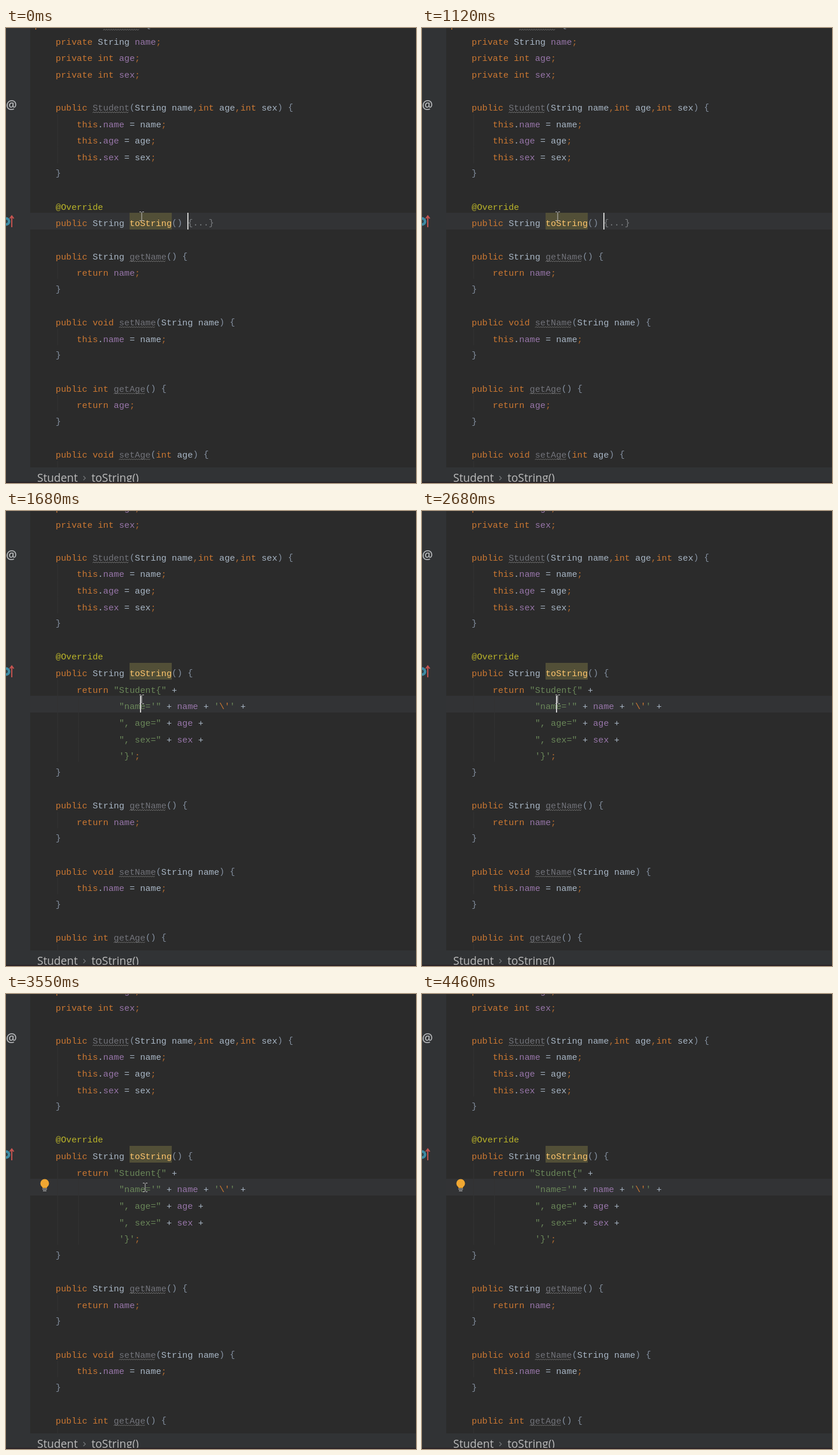
Animation of 710 by 788 pixels, one loop 4960 ms. Source, as an HTML page with a canvas:

```html
<!DOCTYPE html>
<html lang="en">
<head>
<meta charset="utf-8">
<style>
  html, body { margin: 0; width: 100%; height: 100%; overflow: hidden; background: #2b2b2b; }
  canvas { display: block; }
</style>
</head>
<body>
<canvas id="stage" width="710" height="788"></canvas>
<script>
const ctx = document.getElementById('stage').getContext('2d');
const LOOP = 4960, LEFT = 86, PITCH = 9.14, ROW = 28.62, BAR_TOP = 761;
const CODE_FONT = '15.23px "Liberation Mono", monospace';
const UI_FONT = '"Open Sans", "Noto Sans", sans-serif';

const C = {
  keyword: '#cc7832', text: '#a9b7c6', bracket: '#8490a0', field: '#9876aa', string: '#6a8759',
  separator: '#b06a31', note: '#bbb529', method: '#ffc66d', unused: '#72737a', fold: '#7c7f82'
};

const head = `public class Student {
    private String name;
    private int age;
    private int sex;

    public Student(String name,int age,int sex) {
        this.name = name;
        this.age = age;
        this.sex = sex;
    }

    @Override`;
const folded = '    public String toString() {...}';
const expanded = String.raw`    public String toString() {
        return "Student{" +
                "name='" + name + '\'' +
                ", age=" + age +
                ", sex=" + sex +
                '}';
    }`;
const tail = `
    public String getName() {
        return name;
    }

    public void setName(String name) {
        this.name = name;
    }

    public int getAge() {
        return age;
    }

    public void setAge(int age) {
        this.age = age;
    }`;

const TOKEN = new RegExp([
  String.raw`(?<string>"[^"]*"|'}')`,
  String.raw`(?<keyword>\b(?:public|private|class|int|void|this|return)\b|\\')`,
  String.raw`(?<separator>[;,])`,
  String.raw`(?<quote>')`,
  String.raw`(?<note>@\w+)`,
  String.raw`(?<method>toString)`,
  String.raw`(?<unused>Student|[gs]et\w+)`,
  String.raw`(?<field>(?<=this\.|return |" \+ |private \w+ )(?:name|age|sex))`,
  String.raw`(?<fold>\{\.{3}\})`,
  String.raw`(?<bracket>[(){}])`,
  String.raw`(?<text>\w+|[^\s\w])`
].join('|'), 'g');

const tokenize = line => [...line.matchAll(TOKEN)].map(m => {
  const kind = Object.keys(m.groups).find(k => m.groups[k] !== undefined);
  return { text: m[0], col: m.index - 4, kind: kind === 'quote' ? 'string' : kind };
});

const makeView = (body, firstRow) =>
  [head, body, tail].join('\n').split('\n').map((line, i) => ({
    row: firstRow + i, indent: line.search(/\S/), tokens: tokenize(line)
  }));
const foldedView = makeView(folded, -1);
const expandedView = makeView(expanded, -3);

const colX = col => LEFT + col * PITCH;
const rowTop = row => Math.round(5.5 + row * ROW);

function rect(color, x, y, w, h) {
  ctx.fillStyle = color;
  ctx.fillRect(x, y, w, h);
}

function label(text, x, y, color, font) {
  ctx.font = font;
  ctx.fillStyle = color;
  ctx.fillText(text, x, y);
}

function stroke(color, width, points) {
  ctx.strokeStyle = color;
  ctx.lineWidth = width;
  ctx.beginPath();
  points.forEach(([x, y]) => ctx.lineTo(x, y));
  ctx.stroke();
}

function disc(color, x, y, r) {
  ctx.fillStyle = color;
  ctx.beginPath();
  ctx.arc(x, y, r, 0, 2 * Math.PI);
  ctx.fill();
}

function wave(x, y, width) {
  const points = [];
  for (let i = 0; i <= width / 2; i++) points.push([x + 2 * i, y + (i % 2 ? -1 : 1)]);
  stroke('#737373', 1, points);
}

function drawLine({ row, indent, tokens }) {
  const top = rowTop(row), base = top + 23;
  if (indent >= 8) rect('#323232', 89, top, 1, ROW);
  if (indent >= 16) rect('#323232', 125, top, 1, ROW);
  for (const { text, col, kind } of tokens) {
    const x = colX(col), width = text.length * PITCH;
    if (kind === 'method') rect('#524f37', x, top, width, 29);
    const lift = kind === 'bracket' || kind === 'fold' ? 1 : 0;
    label(text, x, base - lift, C[kind], CODE_FONT);
    if (kind === 'unused') wave(x, base + 3, width);
  }
}

function drawGutterIcons(shift) {
  label('@', 0, rowTop(4 + shift) + 21, '#b4b6b8', '600 21px ' + UI_FONT);
  const y = rowTop(11 + shift) + 15;
  disc('#3d8ba3', 0, y, 7.5);
  disc('#2c3e46', 0, y, 3);
  stroke('#c75450', 2, [[10, y + 10], [10, y - 9]]);
  stroke('#c75450', 2, [[6.5, y - 5], [10, y - 9.5], [13.5, y - 5]]);
}

function drawBulb() {
  disc('#f0a732', 67, 328, 7.5);
  rect('#f0a732', 63, 332, 8, 4);
  rect('#a8aaab', 63, 337, 8, 1.5);
  rect('#a8aaab', 64, 340, 6, 1.5);
}

function drawPointer([x, y]) {
  rect('#c4c4c4', x - 0.5, y - 7, 1, 14);
  for (const end of [-8, 7]) {
    rect('#c4c4c4', x - 4, y + end, 3, 1);
    rect('#c4c4c4', x + 1, y + end, 3, 1);
  }
}

function drawBreadcrumb() {
  const font = '19.2px ' + UI_FONT;
  rect('#313335', 0, BAR_TOP, 710, 27);
  label('Student', 54, 786, '#bbbbbb', font);
  stroke('#777a7c', 1.2, [[134, 776], [137.5, 779.5], [134, 783]]);
  label('toString()', 148, 786, '#bbbbbb', font);
  rect('#2a2326', 0, 786, 710, 2);
}

// The pointer leaves in five held positions, then disappears.
const exitPath = [[241, 335], [264, 430], [302, 556], [357, 652], [459, 612]];
function pointerAt(t) {
  if (t < 3550) return [235, 326];
  if (t >= 4180) return null;
  return exitPath[Math.min(4, Math.floor((t - 3550) / 120))];
}

const toggles = [410, 1120, 1680, 2240, 2680];

function draw(t) {
  const isOpen = toggles.filter(time => t >= time).length % 2 === 1;
  const caretOn = t < 3550 || (t >= 4030 && t < 4460);

  rect('#2b2b2b', 0, 0, 710, 788);
  rect('#313335', 0, 0, 42, 788);
  rect('#323335', 42, 320, 668, 29);
  (isOpen ? expandedView : foldedView).forEach(drawLine);
  drawGutterIcons(isOpen ? -2 : 0);
  if (t >= 3550) drawBulb();
  if (caretOn) rect('#d0d0d0', isOpen ? 232 : 314, 320, 2, 29);
  const pointer = pointerAt(t);
  if (pointer) drawPointer(pointer);
  drawBreadcrumb();
}

const start = performance.now();
function tick() {
  draw((performance.now() - start) % LOOP);
  requestAnimationFrame(tick);
}
tick();
</script>
</body>
</html>
```
